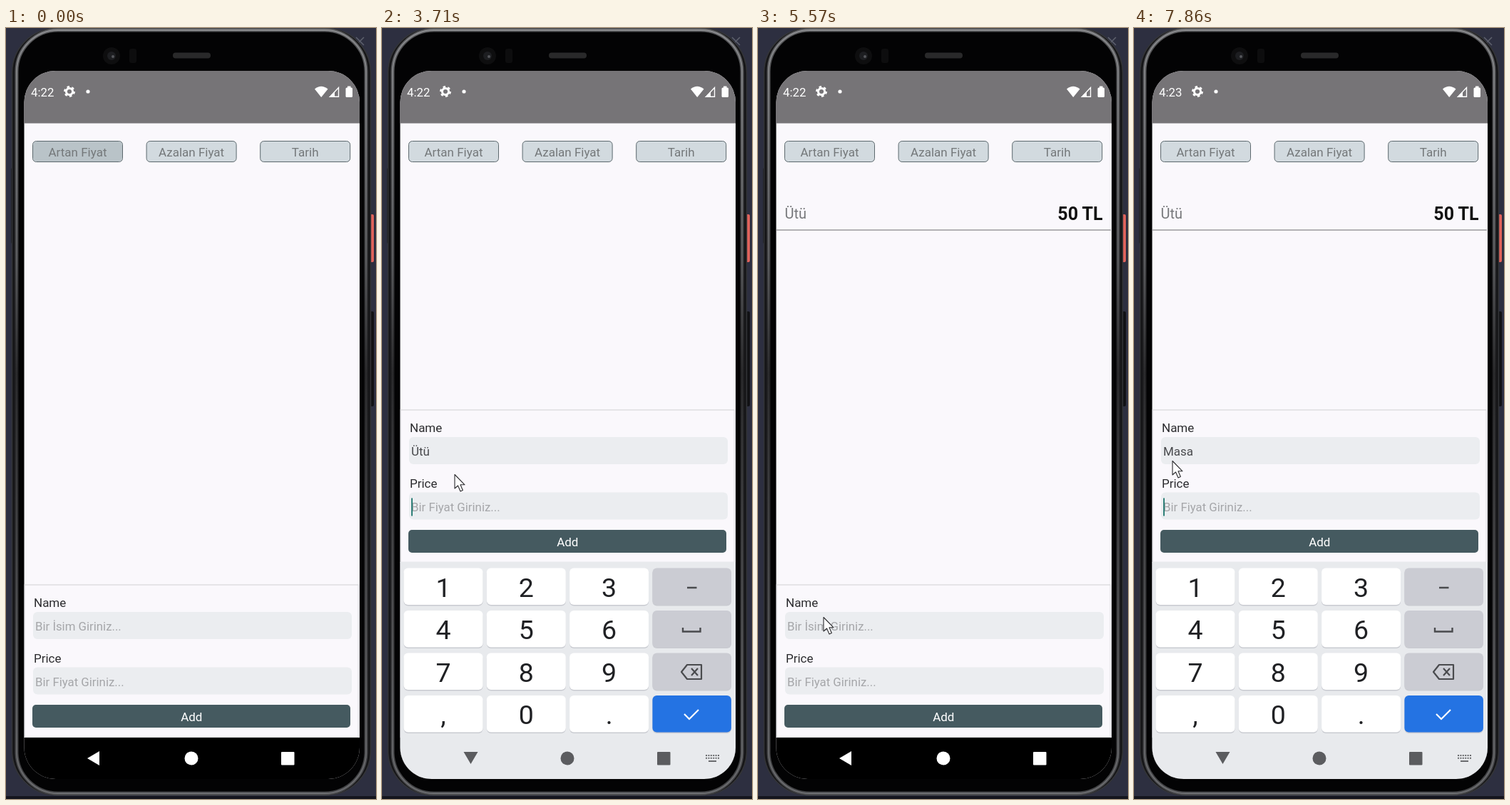
Recreate the animation shown at these times as an HTML page. Size 519x1080 px, loop 8 s.

```html
<!DOCTYPE html>
<html lang="tr">
<head>
<meta charset="utf-8">
<title>Price list</title>
<style>
  html, body { margin: 0; width: 100%; height: 100%; overflow: hidden; background: #2d2f40; }
  svg { display: block; width: 100%; height: 100%; font-family: Roboto, sans-serif; }
  text { text-decoration-thickness: 1px; }
</style>
</head>
<body>
<svg id="stage" viewBox="0 0 519 1080"></svg>
<script>
const TICKS = 56, RATE = 7;          // the picture advances seven times a second
const LETTERS_UP = -298, NUMBERS_UP = -245;
const INK = '#4a4b4e';

// ---- drawing helpers
const rect = (x, y, w, h, fill, rx = 0, more = '') =>
  `<rect x="${x}" y="${y}" width="${w}" height="${h}" rx="${rx}" fill="${fill}" ${more}/>`;
const text = (x, y, size, fill, str, more = '') =>
  `<text x="${x}" y="${y}" font-size="${size}" fill="${fill}" ${more}>${str}</text>`;
const mid = (x, y, size, fill, str, more = '') =>
  text(x, y, size, fill, str, `text-anchor="middle" ${more}`);
const path = (d, fill, more = '') => `<path d="${d}" fill="${fill}" ${more}/>`;
const line = (d, color, width, more = '') =>
  path(d, 'none', `stroke="${color}" stroke-width="${width}" ${more}`);
const circle = (x, y, r, fill, more = '') => `<circle cx="${x}" cy="${y}" r="${r}" fill="${fill}" ${more}/>`;
const ring = (x, y, r, color, width, more = '') =>
  circle(x, y, r, 'none', `stroke="${color}" stroke-width="${width}" ${more}`);
const at = (x, y, body) => `<g transform="translate(${x} ${y})">${body}</g>`;
const group = (id, body, more = '') => `<g id="${id}" ${more}>${body}</g>`;

const gear = (x, y, r, color) =>
  ring(x, y, r * .57, color, r * .38) +
  ring(x, y, r * .82, color, r * .34, 'pathLength="12" stroke-dasharray="1 1"');

// ---- phone
function phone() {
  return rect(0, 1076, 519, 4, '#14151d') +
    line('M491 13l11 11m0-11l-11 11', '#5d606c', 1.6) +
    rect(510, 261, 6, 67, '#e2635c', 2) +
    rect(510, 397, 6, 133, '#111114', 2) +
    rect(7, 196, 4, 106, '#191a20', 2) +
    rect(8.5, .5, 503, 1074, '#161618', 62, 'stroke="#333437" stroke-width="1.5"') +
    rect(15, 3, 490, 1069, '#030304', 58, 'stroke="url(#rim)" stroke-width="5" stroke-opacity=".6"') +
    rect(15, 3, 490, 1069, 'none', 58, 'stroke="url(#rim)" stroke-width="1.8"') +
    circle(148, 39, 12, '#0e0e0f') + circle(148, 39, 6, '#1d1e21') + circle(150, 40, 2, '#55575b') +
    rect(173, 29, 10, 20, '#0d0d0e', 3) +
    rect(234, 34.5, 53, 8, '#29292a', 4);
}

function statusBar() {
  return rect(25, 60, 472, 73.5, '#767477') +
    text(35, 96, 16.8, '#fff', '4:22', 'id="clock"') +
    gear(89, 89, 8, '#fff') + circle(115, 89, 2.6, '#fff') +
    path('M433 85.5Q442 78 451.500 85.500L442.200 97Z', '#fff') +
    line('M454.500 96.300H466.500V83.500Z', '#fff', 1.4) + path('M453 97H461V89Z', '#fff') +
    rect(476.5, 83.5, 9.5, 13.5, '#fff', 1.5) + rect(479, 81.5, 4.5, 3, '#fff');
}

function sortButtons() {
  return ['Artan Fiyat', 'Azalan Fiyat', 'Tarih'].map((label, i) => {
    const x = 37.5 + i * 159.6;
    return rect(x, 158.5, 126, 29, '#d2dadf', 5, 'stroke="#5c686d"') +
      (i ? '' : rect(x + .5, 159, 125, 28, '#b9c3c8', 5, 'id="pressed"')) +
      mid(x + 63, 180, 17, '#74787a', label);
  }).join('');
}

function field(id, label, hint, y) {
  return text(39, y, 17, '#2c2c2f', label) +
    rect(38, y + 7, 447, 38, '#ebedf0', 6) +
    text(41, y + 33, 16.8, '#a5a6a9', hint, `id="${id}Hint"`) +
    text(41, y + 33, 17, '#48494c', '', `id="${id}"`) +
    rect(0, y + 15, 2, 25, '#2f8079', 0, `id="${id}Caret"`);
}

function form() {
  return rect(26, 780, 468.5, 213.5, '#faf8fc', 0, 'stroke="#dedee1" stroke-width="1.5"') +
    field('name', 'Name', 'Bir İsim Giriniz...', 811) +
    field('price', 'Price', 'Bir Fiyat Giriniz...', 888.5) +
    rect(37, 948, 446, 32, '#455a60', 5) + mid(260.3, 971, 17, '#fff', 'Add');
}

function listItem() {
  return text(37.5, 267, 20, '#77787b', 'Ütü') +
    text(483.5, 269, 25, '#111', '50 TL', 'font-weight="700" text-anchor="end"') +
    line('M26 283H495', '#9b9b9e', 1.6);
}

// ---- keyboards
const key = (x, y, w, h, fill = '#fff') =>
  rect(x, y + 1.5, w, h, '#c9cbd1', 6) + rect(x, y, w, h, fill, 6);
const GREY = '#cbccd3', BLUE = '#2473e3';

const eraser = (x, y) => at(x, y,
  line('M-6 -10H14V10H-6L-14 0ZM0 -5L9 5M9 -5L0 5', INK, 2.2, 'stroke-linejoin="round"'));
const check = (x, y) => line(`M${x - 10} ${y}l7 7l13 -13`, '#fff', 2.2);
const mic = at(470, 722, rect(-3.5, -12, 7, 15, INK, 3.5) +
  line('M-7.500 -1a7.500 7.500 0 0 0 15 0M0 6.500V12', INK, 2.2));
const roundButton = chevron => circle(55, 722, 18.5, '#fff') + line(chevron, INK, 2);

function toolbar() {
  const sticker = at(117, 722,
    line('M-9 -9H9V3L3 9H-9Z M9 3H3V9', INK, 2, 'stroke-linejoin="round"') +
    circle(-4, -3, 1.5, INK) + circle(4, -3, 1.5, INK) + line('M-5 2Q-1 6 4 2', INK, 1.8));
  const clipboard = at(252, 722,
    line('M-8.500 -8.500H8.500V10H-8.500Z', INK, 2, 'stroke-linejoin="round"') +
    rect(-4.5, -12, 9, 6, INK, 2) + line('M-5 -2H5M-5 2H5M-5 6H2', INK, 1.8));
  return roundButton('M58 717l-5 5l5 5') + sticker +
    mid(183.5, 728, 16, INK, 'GIF', 'font-weight="900" letter-spacing=".6"') +
    clipboard + gear(320, 722, 11, INK) + line('M361 709V735', '#c6c8cc', 1.2) +
    [395.5, 403.5, 411.5].map(x => circle(x, 722, 2.3, INK)).join('');
}

function suggestions() {
  return roundButton('M53 717l5 5l-5 5') + line('M191 709V736M327.500 709V736', '#c6c8cc', 1.2) +
    mid(130, 731, 21.5, '#56575a', 'Mas', 'text-decoration="underline"') +
    mid(259, 731, 21.5, '#56575a', 'Mad') + mid(387.5, 731, 21.5, '#56575a', 'Mask');
}

function letterBoard() {
  const rows = [['qwertyuiop', 51, 757], ['asdfghjkl', 74, 817], ['zxcvbnm', 120.3, 877.5]];
  const keys = rows.map(([chars, x0, y], row) => [...chars].map((c, i) => {
    const x = x0 + i * 46.38;
    return key(x - 20.2, y, 40.4, 48) +
      mid(x, y + 31.5, 26.5, '#202124', c, 'class="letter"') +
      (row ? '' : mid(x + 15, y + 12.5, 11.5, '#5f6064', (i + 1) % 10));
  }).join('')).join('');
  const smiley = at(166.5, 962, ring(0, 0, 10.8, INK, 2) + circle(-3.8, -3, 1.6, INK) +
    circle(3.8, -3, 1.6, INK) + line('M-5.500 2.500Q0 9 5.500 2.500', INK, 2));
  return rect(25, 696, 472, 400, '#e8eaed') + group('tools', toolbar()) +
    group('words', suggestions()) + mic + keys +
    key(31, 877.5, 63.5, 48.5, GREY) + key(425.5, 877.5, 64, 48.5, GREY) + eraser(457.5, 902) +
    path('M62 889.500L74.500 902.500H68V913H56V902.500H49.500Z', 'none',
      `id="shift" stroke="${INK}" stroke-width="2.200" stroke-linejoin="round"`) +
    key(31, 937, 63.5, 50, GREY) + mid(62.5, 968.5, 17.5, INK, '?123', 'font-weight="500"') +
    key(100.3, 937, 40.4, 50, GREY) + mid(120.5, 971, 24, INK, ',') +
    key(146.5, 937, 40.4, 50) + smiley + key(193, 937, 180, 50) +
    key(379, 937, 40.4, 50, GREY) + mid(399, 972, 24, INK, '.') +
    key(425.5, 937, 64, 50, BLUE) + check(457.5, 962);
}

function numberBoard() {
  const colX = i => 30.5 + i * 116.3, rowY = i => 756.5 + i * 59.5;
  const digits = [...'123456789,0.'].map((c, i) => {
    const x = colX(i % 3), y = rowY(Math.floor(i / 3));
    return key(x, y, 111, 51.5) + mid(x + 55.5, y + 40, 37.5, '#202124', c);
  }).join('');
  const side = [0, 1, 2, 3].map(i => key(colX(3), rowY(i), 110.5, 51.5, i < 3 ? GREY : BLUE)).join('');
  return rect(25, 748, 472, 400, '#e8eaed') + digits + side +
    line('M428 784H441.500M422 840V845.500H446.500V840', INK, 2.4) + eraser(434, 902) + check(434, 961);
}

function navBar() {
  const dots = [0, 1].map(r =>
    line(`M454 ${1019 + r * 3.7}H473`, '#6a6b6e', 2, 'stroke-dasharray="2 1.400"')).join('');
  return '<path id="back" d="M-10.500 0L6.500 -10V10Z"/>' +
    '<circle cx="260" cy="1023" r="9.500"/><rect x="386" y="1014" width="18.500" height="18.500" rx="1"/>' +
    group('switcher', dots + line('M458 1027H469', '#6a6b6e', 2));
}

const stage = document.getElementById('stage');
stage.innerHTML = `<defs>
  <clipPath id="screen"><rect x="25.500" y="60" width="470.500" height="992" rx="44"/></clipPath>
  <linearGradient id="rim" x1="0" y1="0" x2="0" y2="1">
    <stop offset="0" stop-color="#8b8c8f"/><stop offset=".3" stop-color="#5e5f62"/>
    <stop offset=".45" stop-color="#2c2c2e"/><stop offset="1" stop-color="#6d6e71"/>
  </linearGradient></defs>` + phone() +
  `<g clip-path="url(#screen)">` + rect(25, 60, 472, 994, '#faf8fc') + statusBar() + sortButtons() +
  group('item', listItem()) + group('form', form()) + rect(25, 994, 472, 60, '#000') +
  group('board', group('letters', letterBoard()) + group('numbers', numberBoard())) +
  group('nav', navBar()) + '</g>' +
  group('cursor', path('M0 0V19.500L4.500 15.500L8 23.500L11.300 22L8 14.300H14Z', '#fff',
    'stroke="#2b2b2e" stroke-width="1.100" stroke-linejoin="round"'));

// ---- story: each entry changes part of the state from its tick on
const start = { name: '', price: '', focus: '', up: 0, board: '', drop: 0, caps: true,
  words: false, item: false, turn: 0, clock: '4:22', blink: 0 };
const opening = tick => [
  [tick, { focus: 'name', blink: tick, caps: true }],
  [tick + 1, { up: LETTERS_UP, board: 'letters', drop: 230, turn: 0 }],
  [tick + 2, { drop: 85, turn: -12 }],
  [tick + 3, { drop: 14, turn: -42 }],
  [tick + 4, { drop: 0, turn: -82 }],
  [tick + 5, { turn: -90 }],
];
const toNumbers = tick => [tick, { focus: 'price', board: 'numbers', up: NUMBERS_UP, words: false, blink: tick }];
const story = [
  ...opening(8),
  [9, { blink: 9 }],
  [15, { name: 'Ü' }],
  [16, { name: 'Ütü', caps: false, blink: 16 }],
  toNumbers(26),
  [29, { price: '5', blink: 29 }],
  [30, { price: '50' }],
  [35, { item: true, name: '', price: '', focus: '' }],
  [37, { up: 0, drop: 45, turn: -80 }],
  [38, { drop: 180, turn: -40 }],
  [39, { board: '', turn: 0 }],
  ...opening(41),
  [44, { clock: '4:23' }],
  [45, { name: 'M' }],
  [46, { name: 'Ma', caps: false }],
  [47, { name: 'Mas', words: true }],
  [48, { name: 'Masa', blink: 48 }],
  toNumbers(53),
];
const stateAt = tick => Object.assign({}, start, ...story.filter(s => s[0] <= tick).map(s => s[1]));

const route = [[1, 104, 172], [6, 264, 848], [21, 264, 848], [25, 102, 625.5], [30, 102, 625.5],
  [33, 97, 712], [37, 97, 712], [39, 92, 825.5], [48, 92, 825.5], [52, 54, 606.5]];
function cursorAt(tick) {
  const next = route.findIndex(p => p[0] >= tick);
  if (next < 0) return route[route.length - 1].slice(1);
  const b = route[next], a = route[Math.max(0, next - 1)];
  const u = b === a ? 1 : (tick - a[0]) / (b[0] - a[0]), e = u * u * (3 - 2 * u);
  return [1, 2].map(i => a[i] + (b[i] - a[i]) * e);
}

// ---- update
const $ = id => document.getElementById(id);
const show = (id, on) => $(id).setAttribute('display', on ? 'inline' : 'none');
const letterKeys = [...stage.querySelectorAll('.letter')];

function drawField(id, s, tick) {
  const el = $(id), focused = s.focus === id;
  el.textContent = s[id];
  el.setAttribute('text-decoration', focused && id === 'name' ? 'underline' : 'none');
  show(id + 'Hint', !s[id]);
  show(id + 'Caret', focused && (tick - s.blink) % 7 < 4);
  $(id + 'Caret').setAttribute('x', 41 + (s[id] ? el.getComputedTextLength() : 0));
}

function draw(tick) {
  const s = stateAt(tick), open = s.board !== '';
  $('clock').textContent = s.clock;
  $('pressed').setAttribute('opacity', Math.max(0, 1 - tick / 3));
  show('item', s.item);
  $('form').setAttribute('transform', `translate(0 ${s.up})`);
  drawField('name', s, tick);
  drawField('price', s, tick);

  show('board', open);
  $('board').setAttribute('transform', `translate(0 ${s.drop})`);
  show('letters', s.board === 'letters');
  show('numbers', s.board === 'numbers');
  show('tools', !s.words);
  show('words', s.words);
  $('shift').setAttribute('fill', s.caps ? INK : 'none');
  for (const k of letterKeys)
    k.textContent = s.caps ? k.textContent.toUpperCase() : k.textContent.toLowerCase();

  $('nav').setAttribute('fill', open ? '#5b5c5f' : '#fff');
  $('back').setAttribute('transform', `translate(124.500 ${open ? 1020.5 : 1023}) rotate(${s.turn})`);
  show('switcher', open);

  show('cursor', tick > 0);
  $('cursor').setAttribute('transform', `translate(${cursorAt(tick)})`);
}

let shown = -1;
function frame() {
  const tick = Math.floor((performance.now() % 8000 + 5) * RATE / 1000) % TICKS;
  if (tick !== shown) draw(shown = tick);
  requestAnimationFrame(frame);
}
frame();
</script>
</body>
</html>
```
